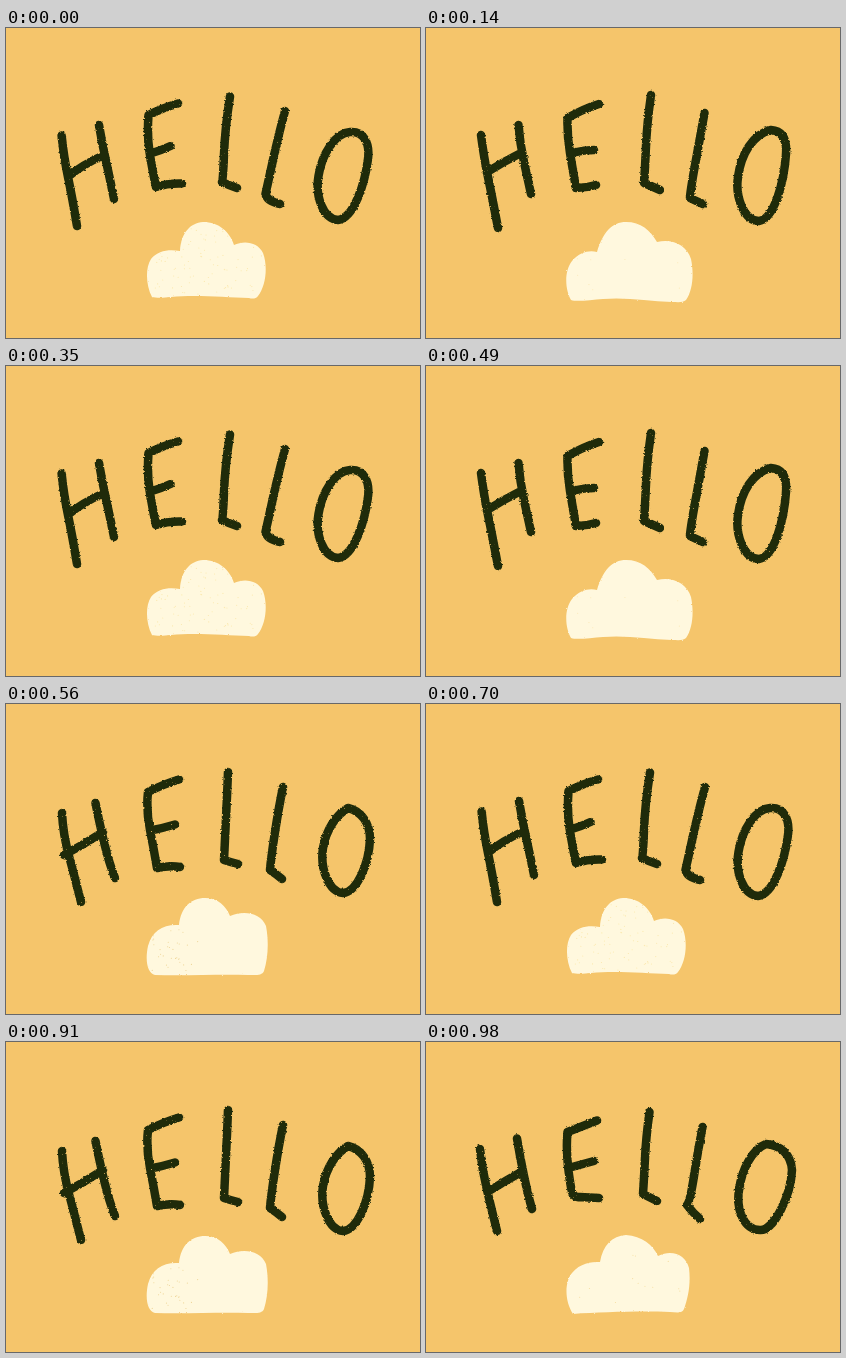
An HTML page that plays this animation: 414x310 px, repeating every 1050 ms.

```html
<!DOCTYPE html>
<html lang="en">
<head>
<meta charset="utf-8">
<title>Hello</title>
<style>
  html, body { margin: 0; width: 100%; height: 100%; overflow: hidden; background: #f5c56b; }
  svg { display: block; width: 100%; height: 100%; }
  .ink { fill: none; stroke: #1f2b0a; stroke-width: 8.5; stroke-linecap: round; stroke-linejoin: round; }
  .cloud { fill: #fff8de; }
</style>
</head>
<body>
<svg id="stage" viewBox="0 0 414 310"></svg>
<script>
const STEP = 70;
// Two beats of rest, then three redrawn poses.
const CYCLE = [0, 0, 1, 2, 3];

const poses = [
  {
    letters: [
      'M55.6 107.5Q58 130 62 149T71 198M93 97Q96 115 100 133T108 171M63 148Q76 137 98 127',
      'M172 75.5Q156 80 142.5 87Q141 108 143.5 124T150 159Q162 155 176 155.5M146 125Q156 122 164.5 118',
      'M224 68.5Q219 100 218 126T216 154Q222 157 231 160',
      'M279 83Q272 109 267 132T259.5 166Q261 173 274 176',
      'M344 104C358 103 364 115 362 131C359 155 348 190 332 192C317 191 309 168 312.5 148C316 126 329 105 344 104Z'
    ],
    cloud: 'M146 269C140 258 139 240 145 231C152 222 164 221 174 223C175 205 184 195 197 194C213 194 224 204 228 217C238 212 252 214 257 225C262 238 260 258 252 268C250 271 246 271 243 270C220 269.5 190 266.5 165 269C157 270 150 270 146 269Z',
    specks: { count: 90, color: '#fbe9b0', x: 143, y: 200, w: 115 }
  },
  {
    letters: [
      'M55 107Q58 130 62 149T72 200M92.5 97Q94 116 98 134T105 166M63 143Q77 134 93 126',
      'M173 76Q157 81 141.5 90Q141 107 144 125T150 160Q160 160 170 157M148 124.5Q158 122 168 122',
      'M225 67Q221 95 220 118T218 155Q225 158 234 162',
      'M278.5 85Q274 109 269 137T264 170Q270 173 277 176',
      'M345 102C357 103 361 112 360 126C358 155 348 191 333 193C318 193 309 169 312 149C315 126 327 106 345 102Z'
    ],
    cloud: 'M145 272C139 262 138 243 146 233C154 224 163 222 171 224C177 204 186 194 200 194C215 194 224 202 231 214C246 210 261 217 265 231C268 245 267 262 260 272C257 275 251 274 246 274C222 273 200 269 177 271C164 272 151 274 145 272Z',
    specks: { count: 8, color: '#fbeab9', x: 145, y: 225, w: 110 }
  },
  {
    letters: [
      'M56 109Q57 130 63 152T75 198M89.5 99Q93 117 98 138T109 174M58 151Q77 141 97 128',
      'M173 75.5Q158 80 142 88Q140 106 144 126T151 164Q164 161 174 163M147 126Q157 124 169 120.5',
      'M222 68Q221 94 220 114T218 156Q224 158 232 160',
      'M277 83Q273 102 269 128T264 166Q270 170 276 175',
      'M342 104C355 107 364 119 364 135C363 160 351 188 337 189C322 188 314 163 317 144C320 126 330 111 342 104Z'
    ],
    cloud: 'M149 271C141 269 139 256 142 242C146 227 157 220 173 221C175 203 185 194 199 194C212 194 220 202 224 212C238 206 255 209 260 222C263 238 262 254 258 267C256 272 249 271 242 271C212 270 180 272 149 271Z',
    specks: { count: 32, color: '#efd79c', x: 144, y: 225, w: 50 }
  },
  {
    letters: [
      'M54 107Q56 127 61 148T71 189M91 96.5Q94 115 98 134T106 167M63 149Q79 139 97 129',
      'M171 78.5Q157 84 141.5 90Q140 106 142 124T146 150Q148 156 154 155L173 156M146 125Q157 122 168 119',
      'M223.5 70Q220 95 219 116T217 152Q223 155 231 159',
      'M276.5 85Q272 108 268 134T261 163Q267 171 274 177',
      'M340 102C354 103 365 112 366 128C365 153 348 189 334 188C318 188 310 168 313 148C316 126 327 107 340 102Z'
    ],
    cloud: 'M147 272C139 260 138 241 146 231C154 221 165 220 174 220C177 203 186 194 200 193C216 194 227 203 232 214C246 207 260 213 263 226C265 242 262 256 258 267C256 272 250 270 244 270C215 269 176 270 147 272Z',
    specks: { count: 14, color: '#f6dfa5', x: 146, y: 210, w: 110 }
  }
];

function random(seed) {
  return () => (seed = (seed * 16807) % 2147483647) / 2147483647;
}

// Roughens the edges of a shape; a positive wear also thins its surface.
function grain(id, seed, rough, wear) {
  const holes = `<feColorMatrix in="noise" values="0 0 0 0 0  0 0 0 0 0  0 0 0 0 0  0 0 6 0 ${-wear}" result="mask"/>
    <feComposite in="shape" in2="mask" operator="in"/>`;
  return `<filter id="${id}" filterUnits="userSpaceOnUse" x="0" y="0" width="414" height="310" color-interpolation-filters="sRGB">
    <feTurbulence type="fractalNoise" baseFrequency=".55" numOctaves="2" seed="${seed}" result="noise"/>
    <feDisplacementMap in="SourceGraphic" in2="noise" scale="${rough}" xChannelSelector="R" yChannelSelector="G" result="shape"/>
    ${wear ? holes : ''}
  </filter>`;
}

function dots({ count, color, x, y, w }, seed) {
  const rnd = random(seed);
  let d = '';
  for (let i = 0; i < count; i++) {
    d += `M${(x + rnd() * w).toFixed(1)} ${(y + rnd() * (267 - y)).toFixed(1)}h.1`;
  }
  return `<path d="${d}" stroke="${color}" stroke-width="1.1" stroke-linecap="round"/>`;
}

function drawPose(pose, i) {
  return `${grain('ink' + i, 11 + i, 2.6, 0.4)}${grain('puff' + i, 31 + i, 2, 0)}
    <clipPath id="inside${i}"><path d="${pose.cloud}"/></clipPath>
    <g class="pose" visibility="hidden">
      <g filter="url(#puff${i})"><path class="cloud" d="${pose.cloud}"/></g>
      <g clip-path="url(#inside${i})">${dots(pose.specks, 7001 + i * 613)}</g>
      <g class="ink" filter="url(#ink${i})"><path d="${pose.letters.join('')}"/></g>
    </g>`;
}

const stage = document.getElementById('stage');
stage.innerHTML = '<rect width="414" height="310" fill="#f5c56b"/>' + poses.map(drawPose).join('');
const layers = [...stage.querySelectorAll('.pose')];

function render(ms) {
  const current = CYCLE[Math.floor(ms / STEP) % CYCLE.length];
  layers.forEach((layer, i) => layer.setAttribute('visibility', i === current ? 'visible' : 'hidden'));
}

const start = performance.now();
function tick() {
  render(performance.now() - start);
  requestAnimationFrame(tick);
}
tick();
</script>
</body>
</html>
```
